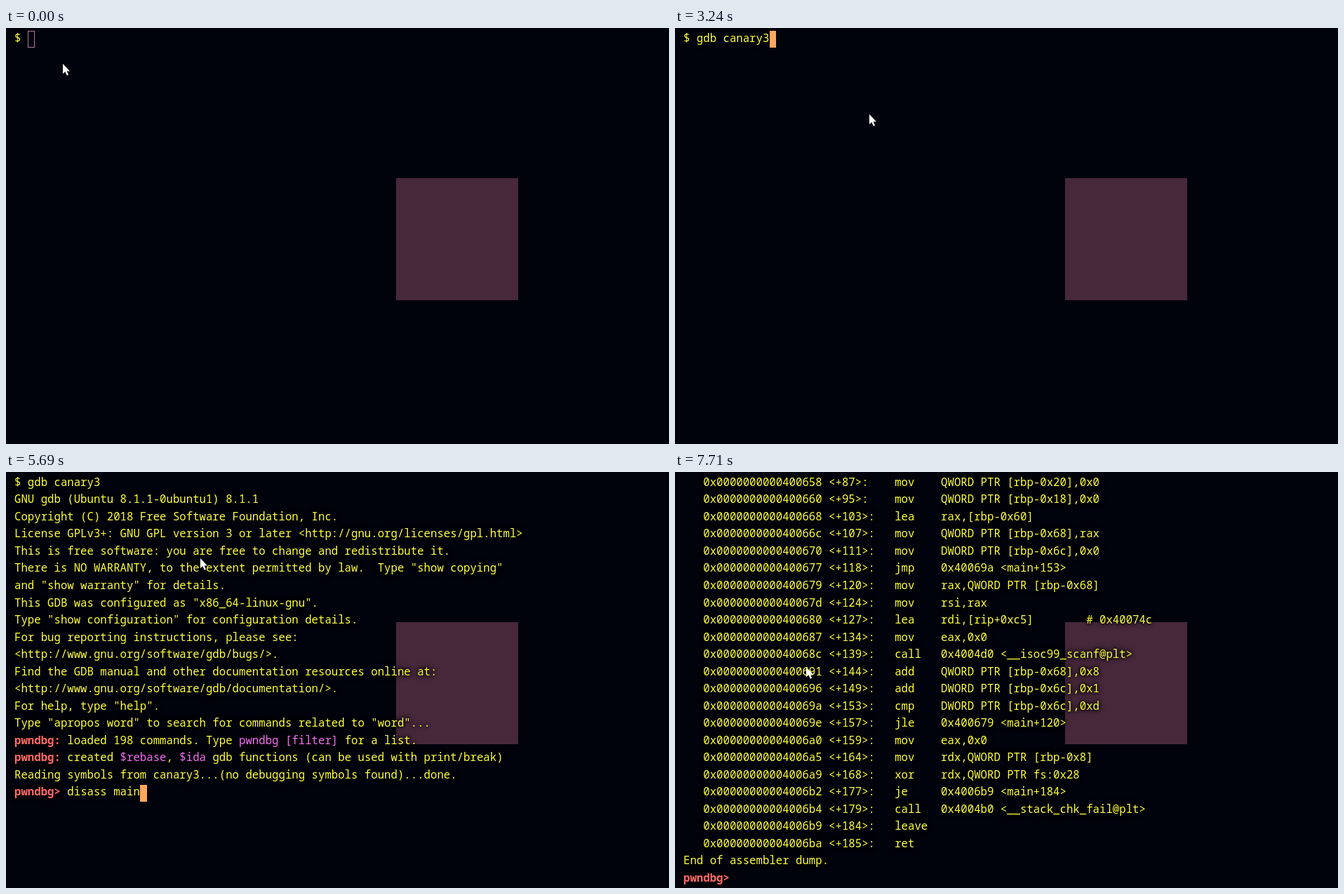
Animation, 945 px wide and 593 px high, one loop 8 s. Source, as an HTML page:

```html
<!DOCTYPE html>
<html lang="en">
<head>
<meta charset="utf-8">
<title>Terminal session</title>
<style>
  :root { --bg: #00030c; }
  html, body { margin: 0; width: 100%; height: 100%; overflow: hidden; background: var(--bg); }
  #stage { position: relative; width: 945px; height: 593px; overflow: hidden; background: var(--bg); }
  #stage > * { position: absolute; }
  #mark { left: 556px; top: 214px; width: 174px; height: 174px; background: #46283a; }
  #text {
    left: 12px; top: 1.8px; margin: 0;
    font: 500 15.7px/24.53px "Noto Sans Mono", "DejaVu Sans Mono", monospace;
    font-variant-ligatures: none;
    color: #ffff3c;
    text-shadow: 0 0 4px var(--bg), 0 0 5px var(--bg), 0 0 8px var(--bg);
  }
  #text b { color: #ff6b64; }
  #text i { color: #f56df0; font-style: normal; }
  #caret { width: 9.42px; height: 24.3px; box-sizing: border-box; background: #ffa75c; }
  #caret.hollow { background: none; border: 1px solid #b4779a; }
  #caret.off { visibility: hidden; }
  #mouse { left: 0; top: 0; overflow: visible; }
</style>
</head>
<body>
<div id="stage">
  <div id="mark"></div>
  <pre id="text"></pre>
  <div id="caret"></div>
  <svg id="mouse" width="12" height="18">
    <path d="M0 0V14.2L3.3 11.3L5.8 16.8L8.1 15.8L5.7 10.5H10Z" fill="#fff"/>
  </svg>
</div>
<script>
const LOOP = 8000, COL = 9.42, ROW = 24.53;
const $ = id => document.getElementById(id);

// *red bold*  ~magenta~
const banner = `$ gdb canary3
GNU gdb (Ubuntu 8.1.1-0ubuntu1) 8.1.1
Copyright (C) 2018 Free Software Foundation, Inc.
License GPLv3+: GNU GPL version 3 or later <http://gnu.org/licenses/gpl.html>
This is free software: you are free to change and redistribute it.
There is NO WARRANTY, to the extent permitted by law.  Type "show copying"
and "show warranty" for details.
This GDB was configured as "x86_64-linux-gnu".
Type "show configuration" for configuration details.
For bug reporting instructions, please see:
<http://www.gnu.org/software/gdb/bugs/>.
Find the GDB manual and other documentation resources online at:
<http://www.gnu.org/software/gdb/documentation/>.
For help, type "help".
Type "apropos word" to search for commands related to "word"...
`;

const loaded = banner + `*pwndbg:* loaded 198 commands. Type ~pwndbg [filter]~ for a list.
*pwndbg:* created ~$rebase~, ~$ida~ gdb functions (can be used with print/break)
Reading symbols from canary3...(no debugging symbols found)...done.
*pwndbg>* `;

// offset, mnemonic, operands
const code = `87 mov QWORD PTR [rbp-0x20],0x0
95 mov QWORD PTR [rbp-0x18],0x0
103 lea rax,[rbp-0x60]
107 mov QWORD PTR [rbp-0x68],rax
111 mov DWORD PTR [rbp-0x6c],0x0
118 jmp 0x40069a <main+153>
120 mov rax,QWORD PTR [rbp-0x68]
124 mov rsi,rax
127 lea rdi,[rip+0xc5]        # 0x40074c
134 mov eax,0x0
139 call 0x4004d0 <__isoc99_scanf@plt>
144 add QWORD PTR [rbp-0x68],0x8
149 add DWORD PTR [rbp-0x6c],0x1
153 cmp DWORD PTR [rbp-0x6c],0xd
157 jle 0x400679 <main+120>
159 mov eax,0x0
164 mov rdx,QWORD PTR [rbp-0x8]
168 xor rdx,QWORD PTR fs:0x28
177 je 0x4006b9 <main+184>
179 call 0x4004b0 <__stack_chk_fail@plt>
184 leave
185 ret`;

const dump = code.split("\n").map(line => {
  const [, off, op, args] = line.match(/^(\d+) (\w+) ?(.*)$/);
  const addr = (0x400601 + +off).toString(16).padStart(16, "0");
  return `   0x${addr} <+${off}>:`.padEnd(32) + op.padEnd(7) + args;
}).join("\n") + "\nEnd of assembler dump.\n*pwndbg>* ";

const shell = n => "$ gdb canary3".slice(0, 2 + n);
const debug = n => loaded + "disass main".slice(0, n);

const screens = [
  [0, shell(0)], [1200, shell(1)], [1320, shell(2)], [1440, shell(4)],
  [1920, shell(5)], [2040, shell(6)], [2160, shell(7)], [2400, shell(10)],
  [3240, shell(11)], [3360, banner], [3620, debug(0)],
  [4090, debug(1)], [4210, debug(2)], [4350, debug(3)], [4470, debug(4)],
  [4720, debug(5)], [4950, debug(6)], [5090, debug(7)],
  [5320, debug(8)], [5440, debug(9)], [5690, debug(11)], [5940, dump]
];

const carets = [
  [0, "hollow"], [240, ""], [840, "off"], [1200, ""],
  [6480, "off"], [6940, ""], [7570, "off"]
];

const moves = [
  [0, 81, 51], [120, 135, 69], [240, 236, 107], [360, 277, 123],
  [6780, 345, 206], [6940, 340, 234], [7100, 280, 255], [7220, 220, 273],
  [7380, 188, 278], [7710, 187, 278]
];

const at = (list, t) => list.findLast(step => step[0] <= t);

const markup = s => s.replace(/&/g, "&amp;").replace(/</g, "&lt;")
  .replace(/\*(.+?)\*/g, "<b>$1</b>").replace(/~(.+?)~/g, "<i>$1</i>");

let shown = null;

function showScreen(s) {
  if (s === shown) return;
  shown = s;
  $("text").innerHTML = markup(s);
  const lines = s.replace(/[*~]/g, "").split("\n");
  const row = lines.length - 1;
  $("caret").style.left = 12.4 + COL * lines[row].length + "px";
  $("caret").style.top = 4 + ROW * row + "px";
}

function draw(now) {
  const t = now % LOOP;
  showScreen(at(screens, t)[1]);
  $("caret").className = at(carets, t)[1];
  const [, x, y] = at(moves, t);
  $("mouse").style.transform = `translate(${x}px, ${y}px)`;
}

const start = performance.now();
function tick() {
  draw(performance.now() - start);
  requestAnimationFrame(tick);
}
tick();
</script>
</body>
</html>
```
